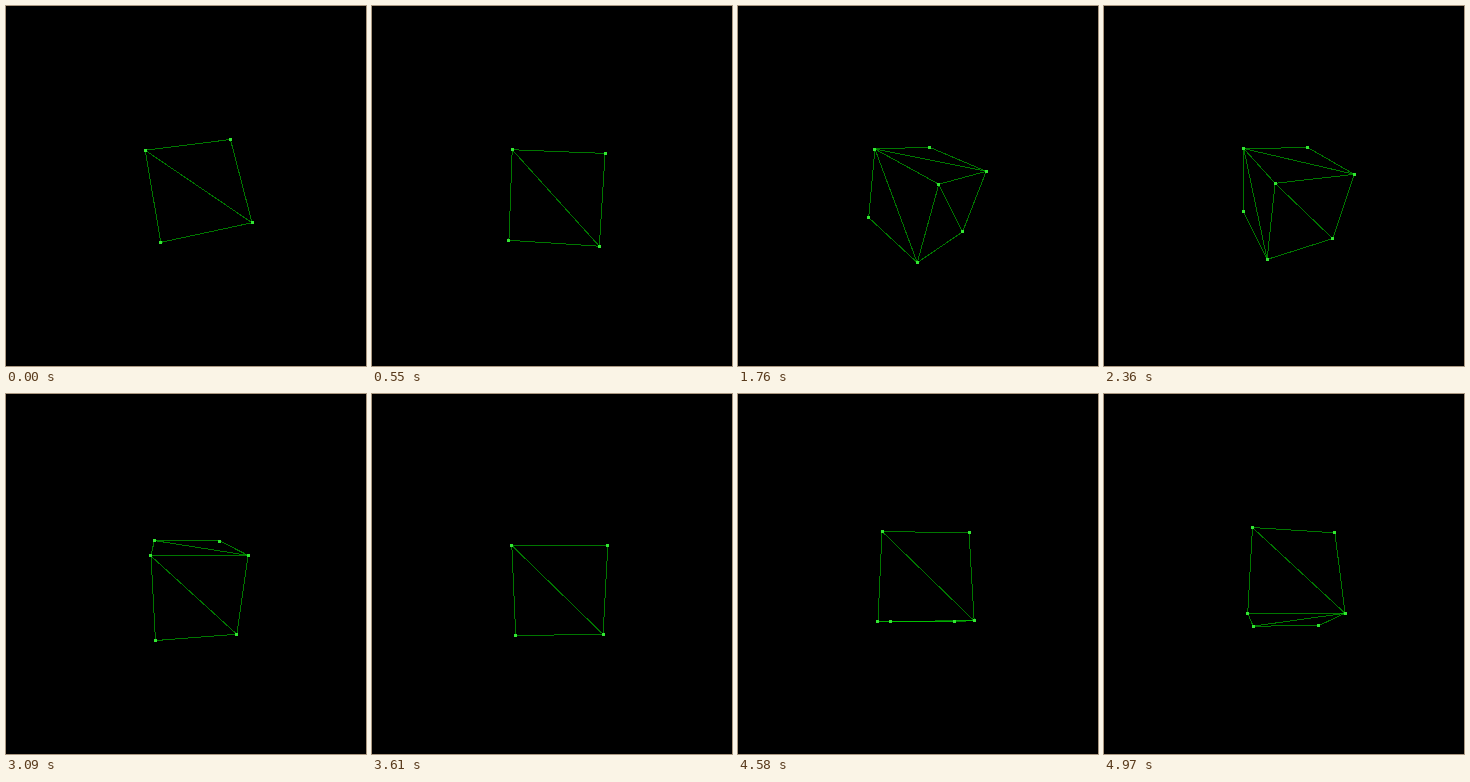
These frames come from a looping animation (360x360 px, 5 s). An HTML page:

```html
<!DOCTYPE html>
<html lang="en">
<head>
<meta charset="utf-8">
<title>Wireframe cube</title>
<style>
  html, body { margin: 0; width: 100%; height: 100%; overflow: hidden; background: #000; }
  svg { display: block; width: 100vw; height: 100vh; shape-rendering: crispEdges; }
  line { stroke: #00d200; stroke-opacity: .56; stroke-width: 1; }
  rect { fill: #33e633; }
</style>
</head>
<body>
<svg id="stage" viewBox="0 0 360 360"></svg>
<script>
const LOOP = 5000, FPS = 33;
const CENTER = [185.8, 189.2], FOCAL = 184, DISTANCE = 2.5;

// [step, angle in degrees]
const ANGLES = [[0, -100], [18, -87], [40, -71], [78, -43.1], [102, -23.4], [138, 2.5], [164, 21.6]];

// Corner index bits: 1 = x, 2 = y, 4 = z. The diagonal joins the first and third corner.
const FACES = [[0, 1, 3, 2], [4, 0, 2, 6], [4, 5, 1, 0], [6, 2, 3, 7]];

const stage = document.getElementById('stage');

function angleAt(step) {
  let k = 1;
  while (k < ANGLES.length - 1 && step > ANGLES[k][0]) k++;
  const [s0, a0] = ANGLES[k - 1], [s1, a1] = ANGLES[k];
  return (a0 + (a1 - a0) * (step - s0) / (s1 - s0)) * Math.PI / 180;
}

// Turn by -a about the axis (cos a, sin a, 0), which itself turns with a.
function projectCorners(a) {
  const c = Math.cos(a), s = Math.sin(a), mix = (1 - c) * c * s;
  const axes = [
    [c + (1 - c) * c * c, mix, s * s],
    [mix, c + (1 - c) * s * s, -s * c],
    [-s * s, s * c, c]
  ];
  return Array.from({ length: 8 }, (_, i) => {
    const p = [0, 1, 2].map(row =>
      axes.reduce((sum, axis, bit) => sum + axis[row] * ((i >> bit & 1) - 0.5), 0));
    const scale = FOCAL / (DISTANCE + p[2]);
    return [CENTER[0] + p[0] * scale, CENTER[1] + p[1] * scale];
  });
}

function facesViewer(face, pts) {
  let area = 0;
  face.forEach((v, i) => {
    const [x0, y0] = pts[v], [x1, y1] = pts[face[(i + 1) % 4]];
    area += x0 * y1 - x1 * y0;
  });
  return area > 0;
}

function render(time) {
  const step = Math.floor((time % LOOP + 5) * FPS / 1000) % (LOOP * FPS / 1000);
  const pts = projectCorners(angleAt(step));
  const edges = new Map(), corners = new Set();
  const addEdge = (a, b) => edges.set(Math.min(a, b) * 8 + Math.max(a, b), [pts[a], pts[b]]);

  for (const face of FACES.filter(f => facesViewer(f, pts))) {
    face.forEach((v, i) => {
      corners.add(v);
      addEdge(v, face[(i + 1) % 4]);
    });
    addEdge(face[0], face[2]);
  }

  const px = n => (n + 0.5).toFixed(2);
  const lines = [...edges.values()].map(([p, q]) =>
    `<line x1="${px(p[0])}" y1="${px(p[1])}" x2="${px(q[0])}" y2="${px(q[1])}"/>`);
  const dots = [...corners].map(v =>
    `<rect x="${Math.round(pts[v][0]) - 1}" y="${Math.round(pts[v][1]) - 1}" width="3" height="3"/>`);
  stage.innerHTML = lines.join('') + dots.join('');
}

const start = performance.now();
function tick() {
  render(performance.now() - start);
  requestAnimationFrame(tick);
}
tick();
</script>
</body>
</html>
```
